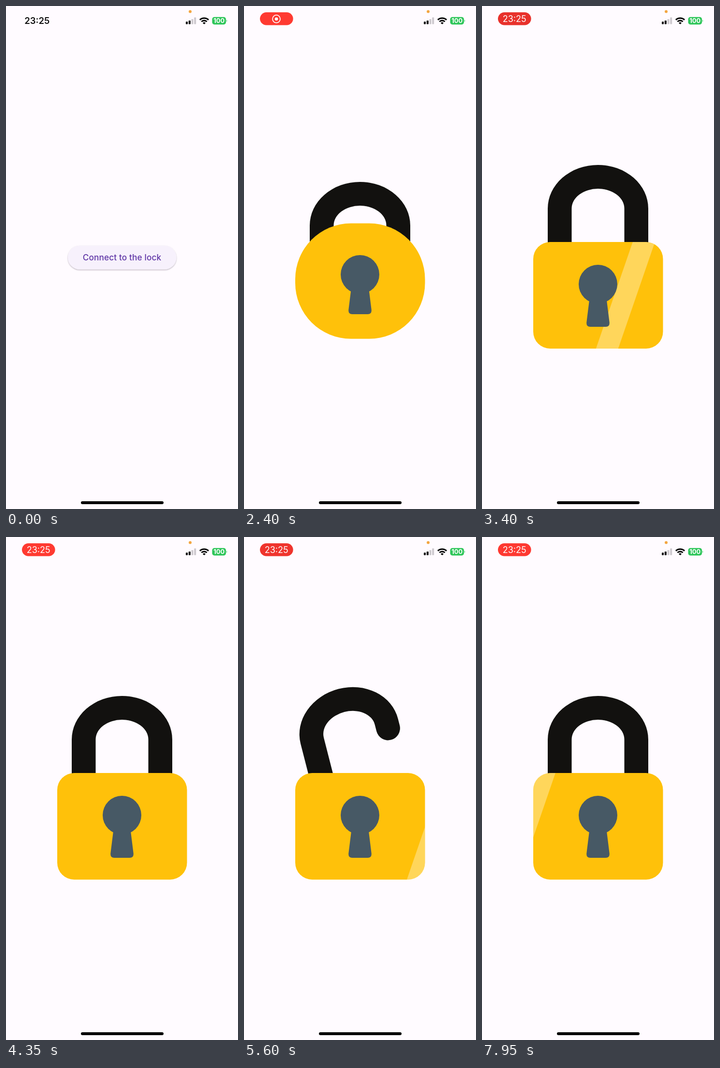
Recreate the animation shown at these times as an HTML page. Size 480x1038 px, loop 8 s.

```html
<!DOCTYPE html>
<html lang="en">
<head>
<meta charset="utf-8">
<title>Lock</title>
<style>
  html, body { margin: 0; width: 100%; height: 100%; overflow: hidden; background: #fffbff; }
  svg { display: block; width: 100%; height: 100%; }
  text { font-family: Inter, Roboto, sans-serif; text-anchor: middle; }
  .hidden { display: none; }
</style>
</head>
<body>
<svg viewBox="0 0 480 1038">
  <defs>
    <clipPath id="bodyClip"><rect class="body" x="106" width="268.5"/></clipPath>
    <clipPath id="buttonClip"><rect x="128" y="494.5" width="224.5" height="49" rx="24.5"/></clipPath>
    <filter id="shadow" x="-10%" y="-20%" width="120%" height="150%">
      <feDropShadow dx="0" dy="1.3" stdDeviation="1.1" flood-color="#2a1838" flood-opacity=".34"/>
    </filter>
  </defs>
  <rect width="480" height="1038" fill="#fffbff"/>

  <!-- status bar -->
  <circle cx="381" cy="11.5" r="3" fill="#f3a640"/>
  <text id="clock" x="64.3" y="37.3" font-size="18.5" font-weight="600" fill="#111">23:25</text>
  <g id="pill">
    <rect id="pillBack" x="33" y="13" width="68.6" height="26.5" rx="13.25"/>
    <g id="record" fill="none" stroke="#fff" stroke-width="1.7">
      <circle cx="67" cy="26.7" r="8"/>
      <circle cx="67" cy="26.7" r="3.3" fill="#fff" stroke="none"/>
    </g>
    <text id="pillClock" x="67.2" y="33" font-size="18" fill="#fff">23:25</text>
  </g>
  <g fill="#000">
    <rect x="372" y="32.3" width="4" height="5.2" rx="1"/>
    <rect x="377.8" y="30" width="4" height="7.5" rx="1"/>
    <rect x="383.5" y="27" width="4" height="10.5" rx="1" fill="#cdc9ce"/>
    <rect x="389.2" y="23.5" width="4" height="14" rx="1" fill="#cdc9ce"/>
  </g>
  <g fill="none" stroke="#000" stroke-width="3">
    <path d="M401 28.6A13 13 0 0 1 419 28.6"/>
    <path d="M404.4 32.3A8 8 0 0 1 415.6 32.3"/>
    <path d="M407 34.9A4.3 4.3 0 0 1 413 34.9L410 37.8Z" fill="#000" stroke="none"/>
  </g>
  <rect x="426.5" y="22.8" width="28.6" height="15.4" rx="4.6" fill="#2fc65a"/>
  <path d="M456.2 28.2Q458.4 30.5 456.2 32.8Z" fill="#2fc65a"/>
  <text x="440.8" y="35.2" font-size="13" font-weight="700" fill="#fff">100</text>
  <rect x="155" y="1022" width="171" height="6" rx="3" fill="#000"/>

  <g id="start">
    <rect x="128" y="494.5" width="224.5" height="49" rx="24.5" fill="#f7f1fc" filter="url(#shadow)"/>
    <circle id="ripple" cx="240" cy="519" fill="#6750a4" opacity=".1" clip-path="url(#buttonClip)"/>
    <text x="240" y="525.3" font-size="17.23" font-weight="500" letter-spacing=".12" fill="#5f35a6">Connect to the lock</text>
  </g>

  <g id="loader">
    <g id="dots" fill="#2196f3"></g>
    <text x="240" y="569.9" font-size="22.15" letter-spacing=".3" fill="#151317">Connecting</text>
  </g>

  <g id="lock">
    <path id="shackle" fill="#12110f"/>
    <rect class="body" x="106" width="268.5" fill="#ffc10a"/>
    <g clip-path="url(#bodyClip)">
      <path id="gleam" d="M0 487h46l-76 220h-46z" fill="#fff" opacity=".33"/>
    </g>
    <g fill="#475965">
      <circle id="hole" cx="240" r="40"/>
      <path id="stem" d="M223.4 596L216.4 652Q215 662 224 662H256Q265 662 263.6 652L256.6 596Z"/>
    </g>
  </g>
</svg>
<script>
const LOOP = 8000, STEP = 50;
const PILL_IN = 450, PILL_CLOCK = 2900;
const TAP = 1300, LOADER = 1398, LOCK = 1900, MORPH = 2203;
const OPEN = 4400, CLOSE = 7150;
const GLEAMS = [2912, 4916, 7861];

const $ = id => document.getElementById(id);
const show = (id, on) => $(id).classList.toggle('hidden', !on);
const set = (el, attrs) => { for (const k in attrs) el.setAttribute(k, attrs[k]); };
const ramp = (t, from, length) => Math.min(1, Math.max(0, (t - from) / length));
const ease = p => (1 - Math.cos(Math.PI * p)) / 2;
const mix = (a, b, p) => a + (b - a) * p;

const dots = Array.from({ length: 5 }, (_, i) => {
  const dot = document.createElementNS('http://www.w3.org/2000/svg', 'rect');
  set(dot, { x: 196.9 + 18.75 * i, width: 11.2, rx: 5.6 });
  return $('dots').appendChild(dot);
});

function drawStatus(t) {
  const pill = ramp(t, PILL_IN, 200);
  show('clock', pill === 0);
  $('pill').style.opacity = pill;
  show('record', t < PILL_CLOCK);
  show('pillClock', t >= PILL_CLOCK);
  const glow = (1 - Math.cos((t - 1450) / 1900 * 2 * Math.PI)) / 2;
  const rgb = [mix(232, 255, glow), mix(49, 58, glow), mix(43, 49, glow)].map(Math.round);
  set($('pillBack'), { fill: `rgb(${rgb})` });
}

// Each dot stretches, rises, shrinks and falls, a little after its neighbour.
function drawDots(t) {
  const cycle = (t - LOADER) / 1600 % 1;
  dots.forEach((dot, i) => {
    const part = from => ramp(cycle - 0.09 * i, from, 0.1);
    const tall = i % 2 ? 60 : 34;
    const height = mix(11.2, tall, part(0) - part(0.28));
    const y = 503 - 17 * (part(0.18) - part(0.47));
    set(dot, { y: y - height / 2, height });
  });
}

function drawLock(t) {
  const grow = ease(ramp(t, LOCK, MORPH - LOCK));
  const left = 1 - ease(ramp(t, MORPH, 340));
  const open = ease(ramp(t, OPEN, 350)) - ease(ramp(t, CLOSE, 400));

  set($('lock'), { transform: `translate(240 519) scale(${grow}) translate(-240 -519)` });

  const height = 220 + 48 * left;
  const rx = Math.min(35 + 213 * left, height / 2);
  const y = 597 - 78 * left - height / 2;
  document.querySelectorAll('.body').forEach(el => set(el, { y, height, rx }));

  set($('hole'), { cy: 574 - 53 * left });
  set($('stem'), { transform: `translate(0 ${-69 * left})` });

  const end = 418 + mix(78, 14, open);
  set($('shackle'), {
    d: `M136 500V418A104 90 0 0 1 344 418V${end}A24.75 24.75 0 0 1 294.5 ${end}V418A54.5 41 0 0 0 185.5 418V500Z`,
    transform: `translate(0 ${93 * left}) rotate(${-14.4 * open} 160.8 497)`
  });

  const start = GLEAMS.filter(s => t >= s).pop();
  show('gleam', start !== undefined);
  if (start !== undefined) set($('gleam'), { transform: `translate(${60 + 0.516 * (t - start)} 0)` });
}

function draw(t) {
  drawStatus(t);
  show('start', t < LOADER);
  show('loader', t >= LOADER && t < LOCK);
  show('lock', t >= LOCK);
  if (t < LOADER) set($('ripple'), { r: 130 * ramp(t, TAP, 150) });
  else if (t < LOCK) drawDots(t);
  else drawLock(t);
}

const origin = performance.now();
function frame() {
  const t = (performance.now() - origin) % LOOP;
  draw(Math.floor(t / STEP) * STEP);
  requestAnimationFrame(frame);
}
frame();
</script>
</body>
</html>
```
